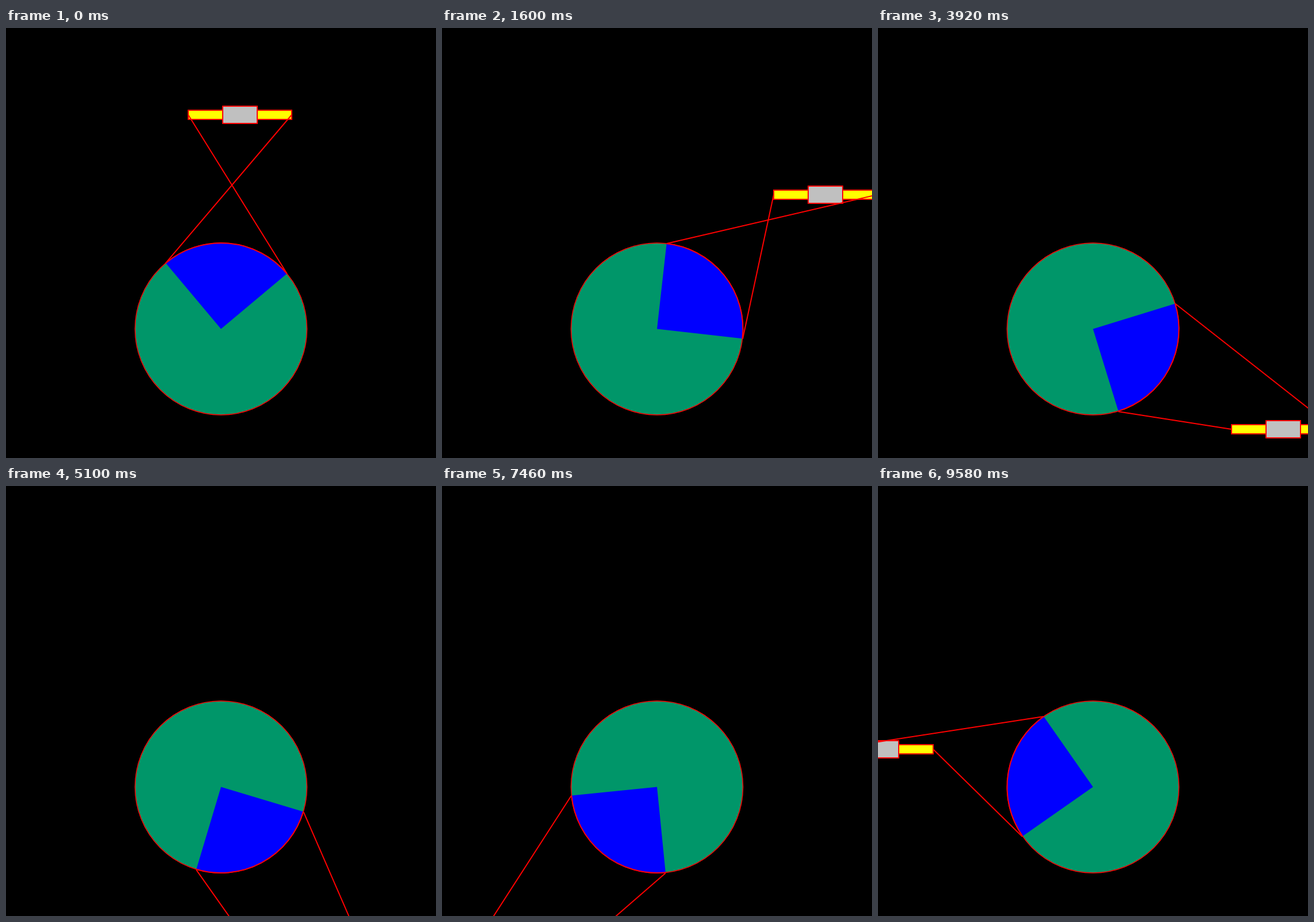
These frames come from a looping animation (748x748 px, 9600 ms). An HTML page with a canvas:

```html
<!DOCTYPE html>
<html lang="en">
<head>
<meta charset="utf-8">
<title>Satellite orbit</title>
<style>
  html, body { margin: 0; width: 100%; height: 100%; overflow: hidden; background: #000; }
  canvas { display: block; }
</style>
</head>
<body>
<canvas id="stage" width="748" height="748"></canvas>
<script>
const ctx = document.getElementById('stage').getContext('2d');
const LOOP = 9600, STEP = 20;
const CENTER = { x: 374, y: 524 };
const PLANET_Y = 523.5, PLANET_RADIUS = 149.5;
const ORBIT = 374, HALF_SPAN = 90;
const START = -85 * Math.PI / 180, HALF_VIEW = Math.PI / 4;

const onCircle = (radius, angle) => ({
  x: CENTER.x + radius * Math.cos(angle),
  y: CENTER.y + radius * Math.sin(angle)
});

function box(x, y, width, height, fill) {
  ctx.fillStyle = fill;
  ctx.fillRect(x - width / 2, y - height / 2, width, height);
  ctx.strokeRect(x - width / 2, y - height / 2, width, height);
}

function line(from, to) {
  ctx.beginPath();
  ctx.moveTo(from.x, from.y);
  ctx.lineTo(to.x, to.y);
  ctx.stroke();
}

function planet(angle) {
  const from = angle - HALF_VIEW, to = angle + HALF_VIEW;
  ctx.beginPath();
  ctx.arc(CENTER.x, PLANET_Y, PLANET_RADIUS, 0, 2 * Math.PI);
  ctx.fillStyle = '#009669';
  ctx.fill();
  ctx.lineWidth = 1.5;
  ctx.stroke();

  ctx.beginPath();
  ctx.moveTo(CENTER.x, PLANET_Y);
  ctx.arc(CENTER.x, PLANET_Y, PLANET_RADIUS, from, to);
  ctx.fillStyle = '#00f';
  ctx.fill();
  ctx.beginPath();
  ctx.arc(CENTER.x, PLANET_Y, PLANET_RADIUS, from, to);
  ctx.lineWidth = 2;
  ctx.stroke();
}

function draw(time) {
  const step = Math.floor((time % LOOP) / STEP);
  // The first move is a double step.
  const angle = START + (step ? 0.01 * (step + 1) : 0);
  const orbit = onCircle(ORBIT, angle);
  const x = Math.floor(orbit.x) + 1, y = Math.floor(orbit.y);

  ctx.fillStyle = '#000';
  ctx.fillRect(0, 0, 748, 748);
  ctx.strokeStyle = '#f00';
  planet(angle);
  box(x, y, 2 * HALF_SPAN, 16, '#ff0');
  box(x, y, 60, 30, '#c0c0c0');
  line({ x: x - HALF_SPAN, y }, onCircle(150, angle + HALF_VIEW));
  line({ x: x + HALF_SPAN, y }, onCircle(150, angle - HALF_VIEW));
}

let startTime;
function tick(now) {
  startTime ??= now;
  draw(now - startTime);
  requestAnimationFrame(tick);
}
requestAnimationFrame(tick);
</script>
</body>
</html>
```
